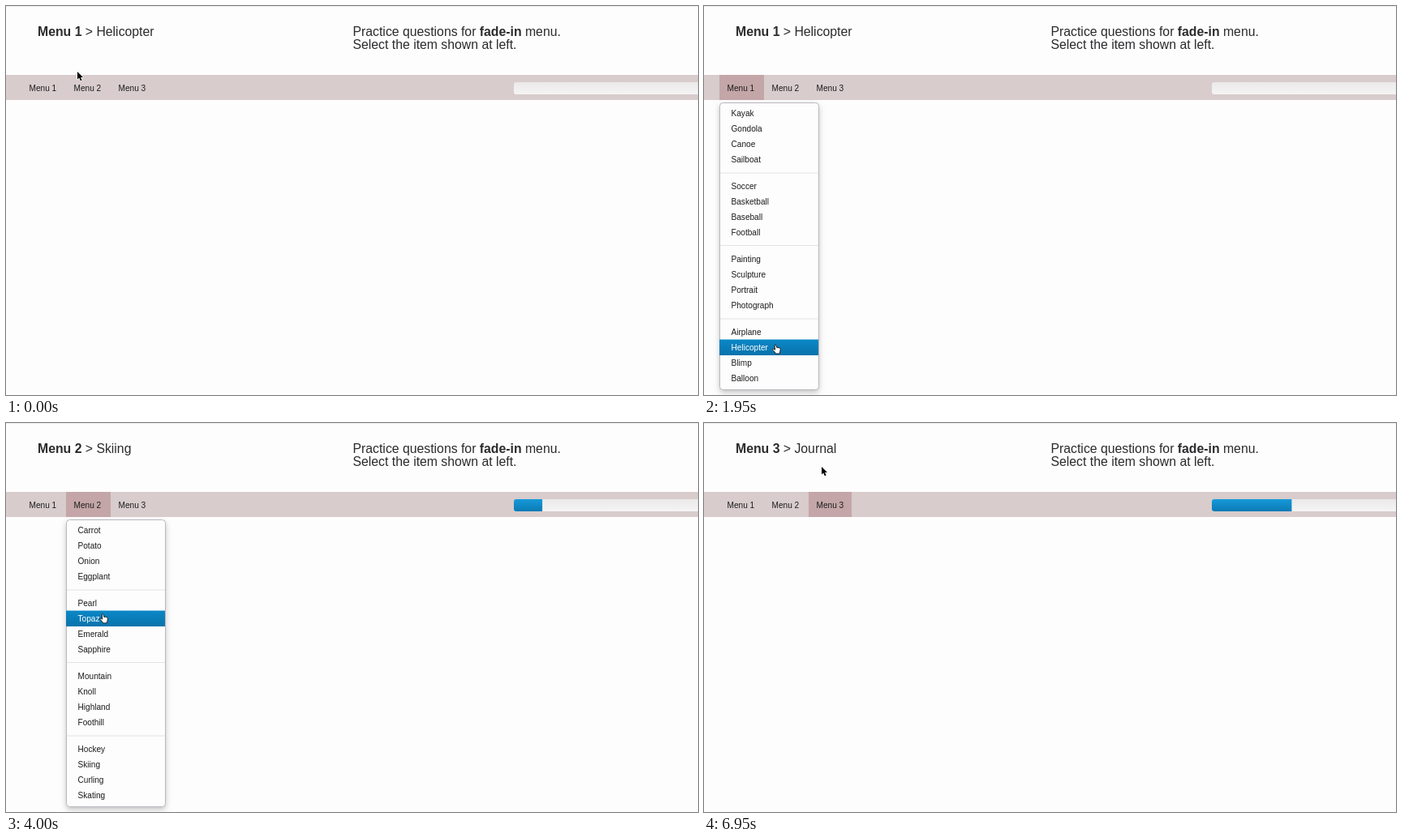
These frames come from a looping animation (853 px wide and 480 px high, 7000 ms). An HTML page with a canvas:

```html
<!DOCTYPE html>
<html lang="en">
<head>
<meta charset="utf-8">
<title>Fade-in menu</title>
<style>
html, body { margin: 0; width: 100%; height: 100%; overflow: hidden; background: #fefdfe; }
canvas { display: block; }
</style>
</head>
<body>
<canvas id="stage" width="853" height="480"></canvas>
<script>
const ctx = document.getElementById('stage').getContext('2d');
const LOOP = 7000, FADE = 500, LAG = 90;
const FAMILY = '"Liberation Sans", Arial, sans-serif';
const INK = '#1c1c1c';

// Starred items appear at once, the others fade in.
const menus = [
  { x: 19, w: 55, open: 580, close: 2000, items: 'Kayak Gondola Canoe Sailboat *Soccer Basketball Baseball Football *Painting Sculpture Portrait Photograph Airplane *Helicopter Blimp *Balloon' },
  { x: 74, w: 55, open: 3250, close: 4740, items: 'Carrot Potato *Onion *Eggplant Pearl Topaz Emerald Sapphire Mountain Knoll Highland Foothill Hockey *Skiing Curling *Skating' },
  { x: 129, w: 53, open: 5600, close: 6650, items: 'Horror Comedy *Drama *Foreign Geothermal Solar Hydro Biomass Roman Byzantine Egyptian Ottoman Paperback Magazine *Newspaper *Journal' }
];
menus.forEach(m => m.items = m.items.split(' '));
const tasks = [['Menu 1', 'Helicopter'], ['Menu 2', 'Skiing'], ['Menu 3', 'Foreign'], ['Menu 3', 'Journal']];

// Pointer stops: time, x, y
const path = [
  [0, 88, 81], [450, 52, 100], [1000, 51, 100], [1600, 86, 423], [1850, 87, 418],
  [2150, 87, 418], [2680, 60, 100], [2820, 68, 63], [3150, 100, 92], [3500, 100, 92],
  [4600, 142, 424], [4800, 142, 424], [5450, 158, 100], [5900, 158, 100],
  [6450, 165, 188], [6680, 165, 188], [6950, 145, 54]
];

function pointerAt(t) {
  const i = path.findIndex(stop => stop[0] > t);
  if (i < 1) return (i ? path.at(-1) : path[0]).slice(1);
  const a = path[i - 1], b = path[i];
  const p = (t - a[0]) / (b[0] - a[0]), s = p * p * (3 - 2 * p);
  return [a[1] + (b[1] - a[1]) * s, a[2] + (b[2] - a[2]) * s];
}

const isOpen = (m, t) => t >= m.open && t < m.close;
const rowY = i => 123 + i * 19 + Math.floor(i / 4) * 14;

// CSS "ease": cubic-bezier(.25, .1, .25, 1)
function ease(p) {
  if (p <= 0) return 0;
  if (p >= 1) return 1;
  let lo = 0, hi = 1, u;
  for (let i = 0; i < 20; i++) {
    u = (lo + hi) / 2;
    if (.75 * u * (1 - u) + u ** 3 < p) lo = u; else hi = u;
  }
  return .3 * u * (1 - u) ** 2 + 3 * u * u * (1 - u) + u ** 3;
}

function rect(x, y, w, h, fill) {
  ctx.fillStyle = fill;
  ctx.fillRect(x, y, w, h);
}

function shade(y, h, top, bottom) {
  const g = ctx.createLinearGradient(0, y, 0, y + h);
  g.addColorStop(0, top);
  g.addColorStop(1, bottom);
  return g;
}

function text(str, x, y, size, color = INK, weight = 'normal') {
  ctx.font = `${weight} ${size}px ${FAMILY}`;
  ctx.fillStyle = color;
  ctx.fillText(str, x, y);
  return x + ctx.measureText(str).width;
}

function header(t) {
  const size = 15.8, color = '#2b2a2c';
  const [menu, item] = tasks[menus.filter(m => t >= m.close).length];
  let x = text(menu, 39, 37.3, size, color, 'bold');
  text(' > ' + item, x, 37.3, size, color);
  x = text('Practice questions for ', 427.5, 37.3, size, color);
  x = text('fade-in', x, 37.3, size, color, 'bold');
  text(' menu.', x, 37.3, size, color);
  text('Select the item shown at left.', 427.5, 52.8, size, color);
}

function progress(t) {
  const width = menus.reduce((sum, m) => sum + 35.1 * ease((t - m.close) / 600), 0);
  ctx.save();
  ctx.beginPath();
  ctx.roundRect(626, 94, 240, 15, 3);
  ctx.clip();
  rect(626, 94, 240, 15, shade(94, 15, '#ebe9e9', '#f5f4f4'));
  rect(626, 94, width, 15, shade(94, 15, '#1699d9', '#0b7bb5'));
  ctx.restore();
}

function bar(t, [hx, hy]) {
  rect(0, 85, 853, 31, '#d8cccd');
  menus.forEach((m, i) => {
    const hover = hy >= 85 && hy < 116 && hx >= m.x && hx < m.x + m.w;
    if (hover || isOpen(m, t)) rect(m.x, 85, m.w, 31, '#c4a6a8');
    text('Menu ' + (i + 1), m.x + 9.5, 104.6, 10.1);
  });
  progress(t);
}

function dropdown(m, t, [px, py]) {
  ctx.save();
  ctx.shadowColor = 'rgba(0,0,0,.25)';
  ctx.shadowBlur = 7;
  ctx.shadowOffsetY = 3;
  ctx.beginPath();
  ctx.roundRect(m.x + .5, 119.5, 122, 354, 4);
  ctx.fillStyle = '#fefdfe';
  ctx.fill();
  ctx.restore();
  ctx.strokeStyle = '#b9b7bc';
  ctx.lineWidth = 1;
  ctx.stroke();
  for (const y of [205.5, 295, 385.5]) rect(m.x + 1, y, 121, 1, '#e4e2e5');

  m.items.forEach((name, i) => {
    const y = rowY(i);
    const active = px >= m.x && px < m.x + 122 && py >= y && py < y + 19;
    if (active) rect(m.x, y - .5, 122, 19.5, shade(y, 19, '#0b87c6', '#0873ab'));
    ctx.globalAlpha = active || name[0] === '*' ? 1 : Math.min(1, (t - m.open) / FADE);
    text(name.replace('*', ''), m.x + 14.5, y + 13.3, 10.1, active ? '#fff' : INK);
    ctx.globalAlpha = 1;
  });
}

const arrow = new Path2D('M0 0V9.5L2.2 7.5L3.8 11.2L5.6 10.4L4 6.9H7Z');
const hand = new Path2D('M0 .5Q1.2-.6 2 .8L2.7 3.6L4 3.2L5.3 3.8L6.5 3.9L7.3 5.2L6.7 8.5L6 11H1.5L.2 8.8L-2.6 6.2Q-2.6 4.8-1.2 5.2L.6 6.2Z');
const beam = new Path2D('M-2-5Q0-5 0-3.8Q0-5 2-5M0-4V4M-2 5Q0 5 0 3.8Q0 5 2 5M-1 1.5H1');

function cursor([x, y], kind) {
  ctx.save();
  ctx.translate(x, y);
  ctx.lineJoin = 'round';
  if (kind === 'beam') {
    ctx.strokeStyle = '#222';
    ctx.stroke(beam);
  } else if (kind === 'hand') {
    ctx.fillStyle = '#fff';
    ctx.fill(hand);
    ctx.strokeStyle = '#222';
    ctx.stroke(hand);
  } else {
    ctx.strokeStyle = '#fff';
    ctx.lineWidth = 1.4;
    ctx.stroke(arrow);
    ctx.fillStyle = '#000';
    ctx.fill(arrow);
  }
  ctx.restore();
}

// Hover state and cursor shape trail the pointer slightly.
function cursorKind(t, [x, y]) {
  const onLabel = m => x > m.x + 9 && x < m.x + 43;
  if (y > 95 && y < 108 && menus.some(onLabel)) return 'beam';
  const onMenu = m => isOpen(m, t) && y > 120 && x >= m.x && x < m.x + 122;
  return menus.some(onMenu) ? 'hand' : 'arrow';
}

function draw(t) {
  const pointer = pointerAt(t), trail = pointerAt(t - LAG);
  rect(0, 0, 853, 480, '#fefdfe');
  rect(0, 0, 853, 1, '#e9e8ec');
  header(t);
  bar(t, trail);
  menus.filter(m => isOpen(m, t)).forEach(m => dropdown(m, t, pointer));
  cursor(pointer, cursorKind(t - LAG, trail));
}

const start = performance.now();
function tick() {
  draw((performance.now() - start) % LOOP);
  requestAnimationFrame(tick);
}
tick();
</script>
</body>
</html>
```
